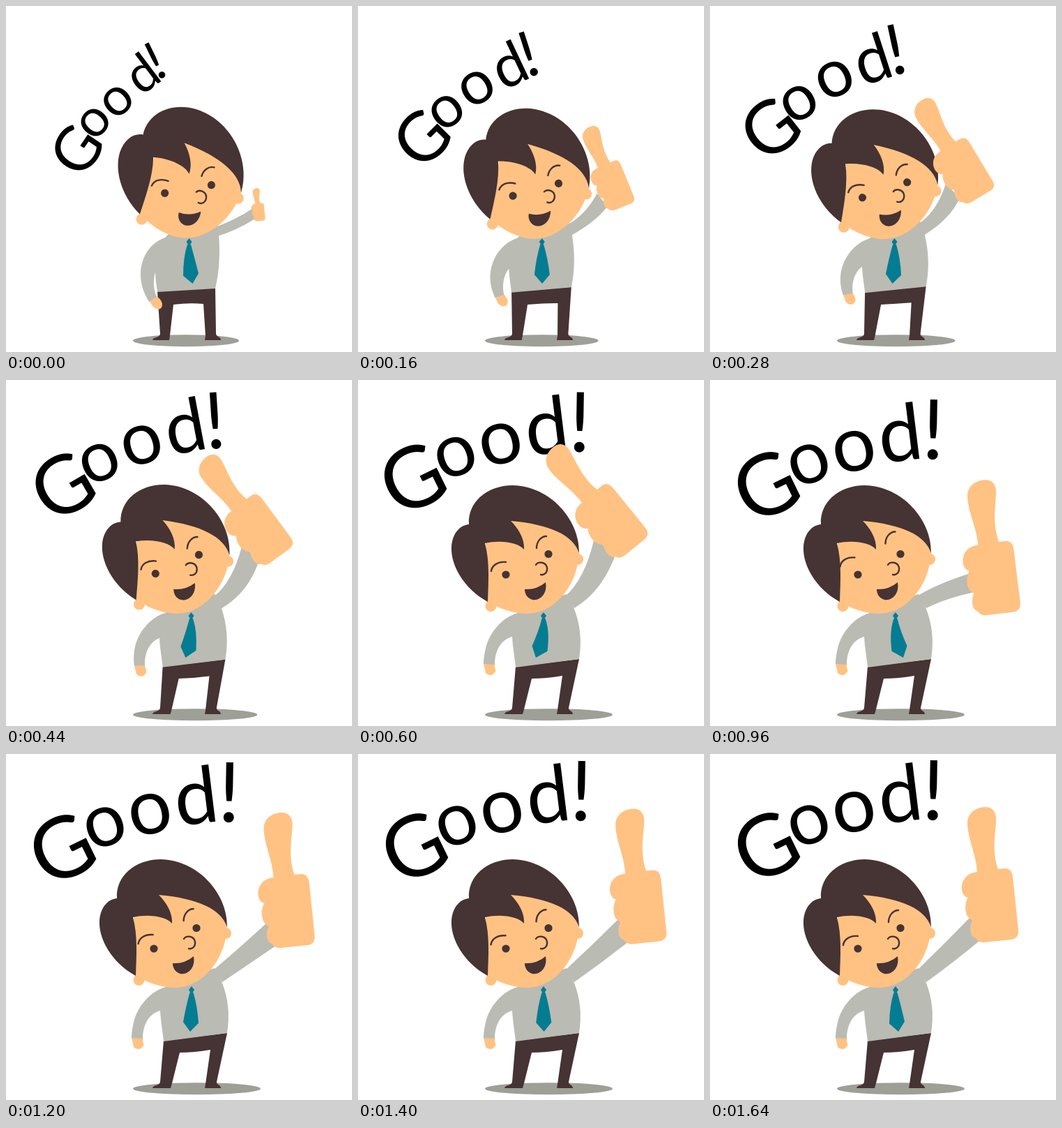
Animation of 496x496 px, one loop 2080 ms. Source, as an HTML page:

```html
<!DOCTYPE html>
<html lang="en">
<head>
<meta charset="utf-8">
<title>Good!</title>
<style>
  html, body { margin: 0; width: 100%; height: 100%; overflow: hidden; background: #fff; }
  svg { display: block; width: 100vw; height: 100vh; }
  text { font-family: Lato, sans-serif; text-anchor: middle; }
</style>
</head>
<body>
<svg id="stage" viewBox="0 0 496 496"></svg>
<script>
const LOOP = 2080, STEP = 40;
const TIMES = [0, 280, 600, 800, 960, 1200, 1640];
const DARK = '#463333', SKIN = '#ffc283', SHIRT = '#babbb2', TIE = '#047c92', SHADE = '#9e9f97';
const stage = document.getElementById('stage');

// Smooth monotone interpolation through poses placed at TIMES
function track(...poses) {
  const last = poses.length - 1;
  const rate = (i, k) => (poses[i + 1][k] - poses[i][k]) / (TIMES[i + 1] - TIMES[i]);
  const slope = (i, k) => {
    if (i === 0) return rate(0, k);
    if (i === last) return 0;
    const a = rate(i - 1, k), b = rate(i, k);
    return a * b > 0 ? 2 * a * b / (a + b) : 0;
  };
  return time => {
    const t = Math.min(time, TIMES[last]);
    let i = 0;
    while (i < last - 1 && t > TIMES[i + 1]) i++;
    const span = TIMES[i + 1] - TIMES[i], u = (t - TIMES[i]) / span, v = 1 - u;
    return poses[i].map((from, k) =>
      from * v * v * (1 + 2 * u) + poses[i + 1][k] * u * u * (3 - 2 * u) +
      span * u * v * (slope(i, k) * v - slope(i + 1, k) * u));
  };
}

const lerp = (a, b, p) => a + (b - a) * p;

// Blends two paths that share the same commands
function blend([a, b], p) {
  const ends = b.match(/[\d.]+/g);
  let i = 0;
  return a.replace(/[\d.]+/g, n => lerp(+n, +ends[i++], p).toFixed(2));
}

const lean = track([0], [.57], [1]);
const bounce = track([0, 0], [0, 0], [-2, 8.5], [0, 29], [0, 19], [0, 3], [0, 0]);
const tieSwing = track([5], [-3], [-11], [-11], [11], [-2], [4]);
const browLift = track([0], [0], [0], [1], [1], [.3], [0]);

// x, y, rotation, scale of the heel of the hand
const hand = track(
  [363, 308, 0, .245], [384, 275, -25, .84], [392, 243, -33, .96], [405, 340, -4.5, 1],
  [410, 335, -1, 1], [407.5, 276, 0, 1], [407, 268, 0, 1]);

// upper control and end, then lower end and control
const sleeve = track(
  [330, 306, 354, 290, 357, 305, 330, 322],
  [325, 295, 338, 255, 358, 275, 345, 305],
  [325, 285, 338, 230, 371, 245, 352, 302],
  [330, 293, 372, 275, 376, 306, 335, 315],
  [330, 290, 380, 275, 384, 303, 340, 312],
  [335, 278, 375, 241, 388, 274, 350, 300],
  [337, 271, 375, 232, 391, 264, 350, 298]);

// glyph, middle height in em, then x, y, rotation, size
const letters = [
  ['G', .36, track([101, 206, -56, 88], [86, 175, -38, 105], [80, 132, -26, 122])],
  ['o', .253, track([127, 167, -48, 75], [128, 139, -30, 92], [142, 101.5, -20, 107])],
  ['o', .253, track([160, 136.5, -42, 76], [179, 105, -25, 96], [206.5, 83, -13, 111])],
  ['d', .365, track([194, 96, -37, 73], [232, 75, -18, 93], [272, 56, -7, 112])],
  ['!', .36, track([213.5, 78, -26, 76], [266, 62, -12, 100], [320, 51.5, 1, 119])]
];

const trousers = [
  'M217 409L300 404L301 470C302 475 308 474 308 479L285 479L286 473L283 427Q262 425 240 428L235 472L234 479L210 479C211 474 220 476 221 470Z',
  'M226 411L317 400L302 470C302 475 308 474 308 479L285 479L286 473L293 424Q270 428 249 428L238 472L236 479L210 479C211 474 220 476 221 470Z'];
const torso = [
  'M228 332C205 340 193 362 193 385C193 400 198 412 205 424L216 417C212 407 210 395 214 381C214 390 216 402 217 410L300 405C306 380 307 355 305 325L302 305L240 320Z',
  'M229 334C207 340 188 362 183 385C181 393 180 400 180 407L196 408C196 390 204 372 221 368C222 385 225 400 226 412L317 400C321 375 319 350 309 326L299 307L240 325Z'];
const restingHand = [
  'M205 422L216 416C222 420 226 427 223 432C220 437 214 434 210 430Z',
  'M180 406L196 407C195 413 200 418 195 420C194 424 186 424 183 420Z'];

const face = 'M183 230L225 195L290 205L317 246C316 290 285 334 243 335C220 335 200 326 186 318Z';
const hair = 'M186 318C150 298 133 264 134 240C135 220 146 208 159 207C157 175 185 151 222 151C275 152 318 200 317 248C308 222 275 207 219 202C230 213 239 228 238 243C230 233 205 229 182 234C189 260 187 290 186 318Z';
const mouth = 'M239 300Q256 301 269 290C272 306 261 317 250 315C243 313 239 307 239 300Z';
const nose = 'M255 265C258 260 269 260 271 269C272 276 267 280 262 279';
const brows = 'M256 241C256 232 262 224 270 224M191 274C192 266 200 260 212 261';
const thumbUp = 'M383 169C382 145 369 120 369 99C369 85 381 76 395 76C405 76 411 83 410 96C409 115 404 140 413 165L423 164C429 164 433 168 434 176L442 252C443 260 439 265 432 266L393 270C387 270 383 268 381 264C373 262 371 250 376 238C366 236 363 216 370 206C357 204 355 172 383 169Z';

const shape = (d, fill, extra = '') => `<path d="${d}" fill="${fill}" ${extra}/>`;
const line = (d, extra = '') =>
  shape(d, 'none', `stroke="${DARK}" stroke-width="2.4" stroke-linecap="round" ${extra}`);
const dot = (x, y, r, fill) => `<circle cx="${x}" cy="${y}" r="${r}" fill="${fill}"/>`;

function drawText(t) {
  const glyphs = letters.map(([glyph, middle, pose]) => {
    const [x, y, angle, size] = pose(t);
    return `<text transform="translate(${x} ${y}) rotate(${angle})" font-size="${size}" y="${middle * size}">${glyph}</text>`;
  });
  return `<g transform="translate(${bounce(t)})">${glyphs.join('')}</g>`;
}

function drawHead(t, p) {
  const [lift] = browLift(t);
  const place = `translate(${lerp(251, 226, p)} ${lerp(237.5, 243, p)}) rotate(${16 * (1 - p)}) translate(-226 -243)`;
  return `<g transform="${place}">` +
    dot(190.5, 324, 8, SKIN) + dot(315, 257, 8, SKIN) +
    shape(face, SKIN) + shape(hair, DARK) +
    dot(212, 279, 5.6, DARK) + dot(273, 249.5, 5.6, DARK) +
    shape(mouth, DARK) + line(nose) +
    line(brows, `transform="translate(${-4.5 * lift} ${-6.5 * lift})"`) + '</g>';
}

function drawTie(t, p) {
  const [s] = tieSwing(t), tilt = .35 * s;
  const blade = `M-2.5 4L2.5 4Q${8 - .1 * s} 22 ${.5 * s + 11} ${47 - tilt}L${s} 60L${.5 * s - 11} ${47 + tilt}Q${-8 - .1 * s} 22 -2.5 4Z`;
  return `<g transform="translate(${lerp(262.5, 266, p)} 338)">` +
    shape('M0 -5L4 0L1 5L-1 5L-4 0Z' + blade, TIE) + '</g>';
}

function drawSleeve(t, p) {
  const [ax, ay, bx, by, cx, cy, dx, dy] = sleeve(t);
  return shape(`M${lerp(300, 298, p)} ${lerp(317, 309, p)}Q${ax} ${ay} ${bx} ${by}L${cx} ${cy}` +
    `Q${dx} ${dy} ${lerp(303, 310, p)} ${lerp(330, 327, p)}Z`, SHIRT);
}

function drawHand(t) {
  const [x, y, angle, scale] = hand(t);
  return shape(thumbUp, SKIN,
    `transform="translate(${x} ${y}) rotate(${angle}) scale(${scale}) translate(-407 -268)"`);
}

function render(now) {
  const t = Math.floor(now % LOOP / STEP) * STEP, [p] = lean(t);
  stage.innerHTML =
    `<ellipse cx="${lerp(258, 273.5, p)}" cy="479.7" rx="${lerp(76, 91.5, p)}" ry="8.5" fill="${SHADE}"/>` +
    drawText(t) +
    shape(blend(trousers, p), DARK) +
    shape(blend(restingHand, p), SKIN) +
    shape(blend(torso, p), SHIRT) +
    drawSleeve(t, p) + drawHead(t, p) + drawTie(t, p) + drawHand(t);
}

function loop() {
  render(performance.now());
  requestAnimationFrame(loop);
}
loop();
</script>
</body>
</html>
```
